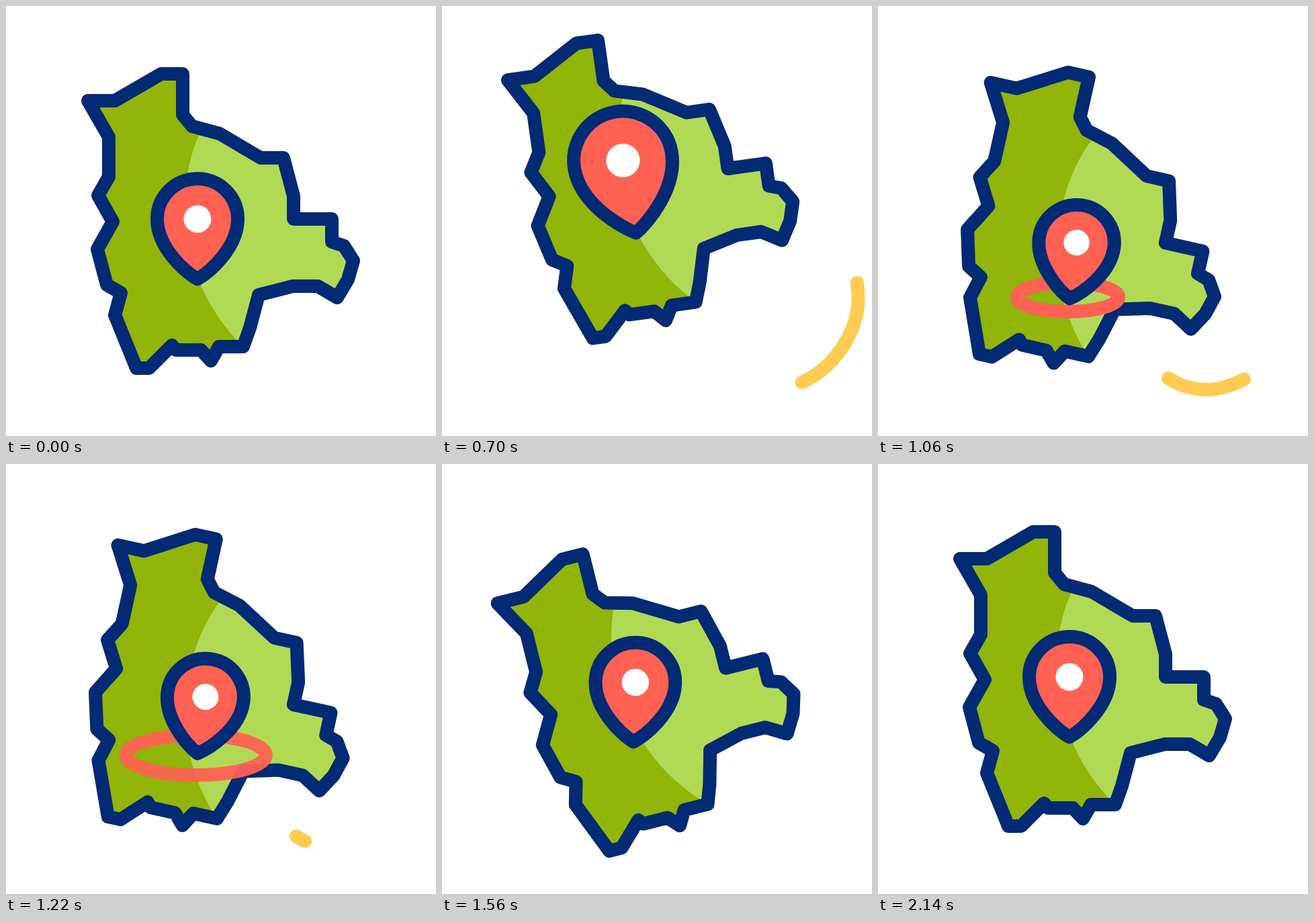
These frames come from a looping animation (640x640 px, 3060 ms). An HTML page:

```html
<!DOCTYPE html>
<html lang="en">
<head>
<meta charset="utf-8">
<title>Map pin</title>
<style>
  html, body { margin: 0; width: 100%; height: 100%; overflow: hidden; background: #fff; }
  svg { display: block; width: 100vw; height: 100vh; }
</style>
</head>
<body>
<svg viewBox="0 0 640 640" fill="none" stroke-width="20" stroke-linejoin="round" stroke-linecap="round">
  <defs>
    <path id="land" d="M263 101V162L277 179 318 190 379 226H413L428 283V317H485V351L503 357 517 379 509 407 493 434 464 417H427L376 430 363 479 353 507H317L305 528 290 512H253L247 505 213 539H194L162 460 171 427 150 415 136 362 159 321 137 282 153 254V195L122 141H162L231 101Z"/>
    <clipPath id="inside"><use href="#land"/></clipPath>
  </defs>
  <path id="swoosh" stroke="#ffcb50" pathLength="100"
    d="M618 412Q619.5 424 619.5 436C619 490 578 546 526 564C514 568 502 571 490 571C468 571 449 565 432 554"/>
  <g id="map">
    <use href="#land" fill="#b1da54"/>
    <path clip-path="url(#inside)" fill="#91b508"
      d="M100 80H293V180C275 215 266 255 266 300C266 375 295 450 353 507V560H100Z"/>
    <use href="#land" stroke="#022a75"/>
  </g>
  <ellipse id="ring" cx="282.7" cy="433.3" stroke="#ff6152"/>
  <g id="pin">
    <path fill="#ff6152" stroke="#022a75" vector-effect="non-scaling-stroke"
      d="M0 0C-17 -10 -60 -46 -60 -89.5A60 60 0 0 1 60 -89.5C60 -46 17 -10 0 0Z"/>
    <circle cy="-89.5" r="20.5" fill="#fff"/>
  </g>
</svg>
<script>
const LOOP = 3060;
const el = id => document.getElementById(id);
const [map, pin, ring, swoosh] = ['map', 'pin', 'ring', 'swoosh'].map(el);

const inOut = u => (1 - Math.cos(Math.PI * u)) / 2;
const out = u => Math.sin(Math.PI * u / 2);
const outQuart = u => 1 - (1 - u) ** 4;
const linear = u => u;

// Each key is [time, value, easing used to arrive there].
function track(...keys) {
  return t => {
    const i = keys.findIndex(key => t < key[0]);
    if (i < 0) return keys[keys.length - 1][1];
    if (i === 0) return keys[0][1];
    const [t0, v0] = keys[i - 1];
    const [t1, v1, ease = inOut] = keys[i];
    return v0 + (v1 - v0) * ease((t - t0) / (t1 - t0));
  };
}

const mapX = track([235, 0], [460, -10.5], [700, 0]);
const mapY = track([235, 0], [660, -61.5, out], [1140, 16.8], [1250, 18], [2100, 0]);
const mapTurn = track([235, 0], [660, -8.4, out], [1140, 14.1], [1670, -17.2], [2140, 0]);

const pinX = track([235, 0], [690, 4], [980, 0.3], [1300, 0]);
const pinY = track([235, 0], [650, -75, out], [980, 29.5], [1840, 0]);
const pinTurn = track([235, 0], [680, -10.4], [1140, 8.4], [1750, 0]);
const pinScale = track([235, 1], [650, 1.24, out], [980, 0.935], [1780, 1]);

const ringSize = track([910, 0], [1510, 110, outQuart]);
const ringAlpha = track([1200, 1], [1560, 0, linear]);

const swooshHead = track([480, 0], [860, 100]);
const swooshTail = track([760, 0], [1300, 100]);

function draw(t) {
  map.setAttribute('transform',
    `translate(${mapX(t)} ${mapY(t)}) rotate(${mapTurn(t)} 320 328)`);
  pin.setAttribute('transform',
    `translate(${285 + pinX(t)} ${406.5 + pinY(t)}) rotate(${pinTurn(t)}) scale(${pinScale(t)})`);

  const rx = ringSize(t);
  ring.setAttribute('rx', rx);
  ring.setAttribute('ry', rx * 0.286);
  ring.setAttribute('opacity', rx > 0 ? ringAlpha(t) : 0);

  const head = swooshHead(t), tail = swooshTail(t);
  swoosh.setAttribute('visibility', head - tail > 0.1 ? 'visible' : 'hidden');
  swoosh.setAttribute('stroke-dasharray', `${Math.max(head - tail, 0.01)} 300`);
  swoosh.setAttribute('stroke-dashoffset', -tail);
}

const start = performance.now();
function tick() {
  draw((performance.now() - start) % LOOP);
  requestAnimationFrame(tick);
}
tick();
</script>
</body>
</html>
```
